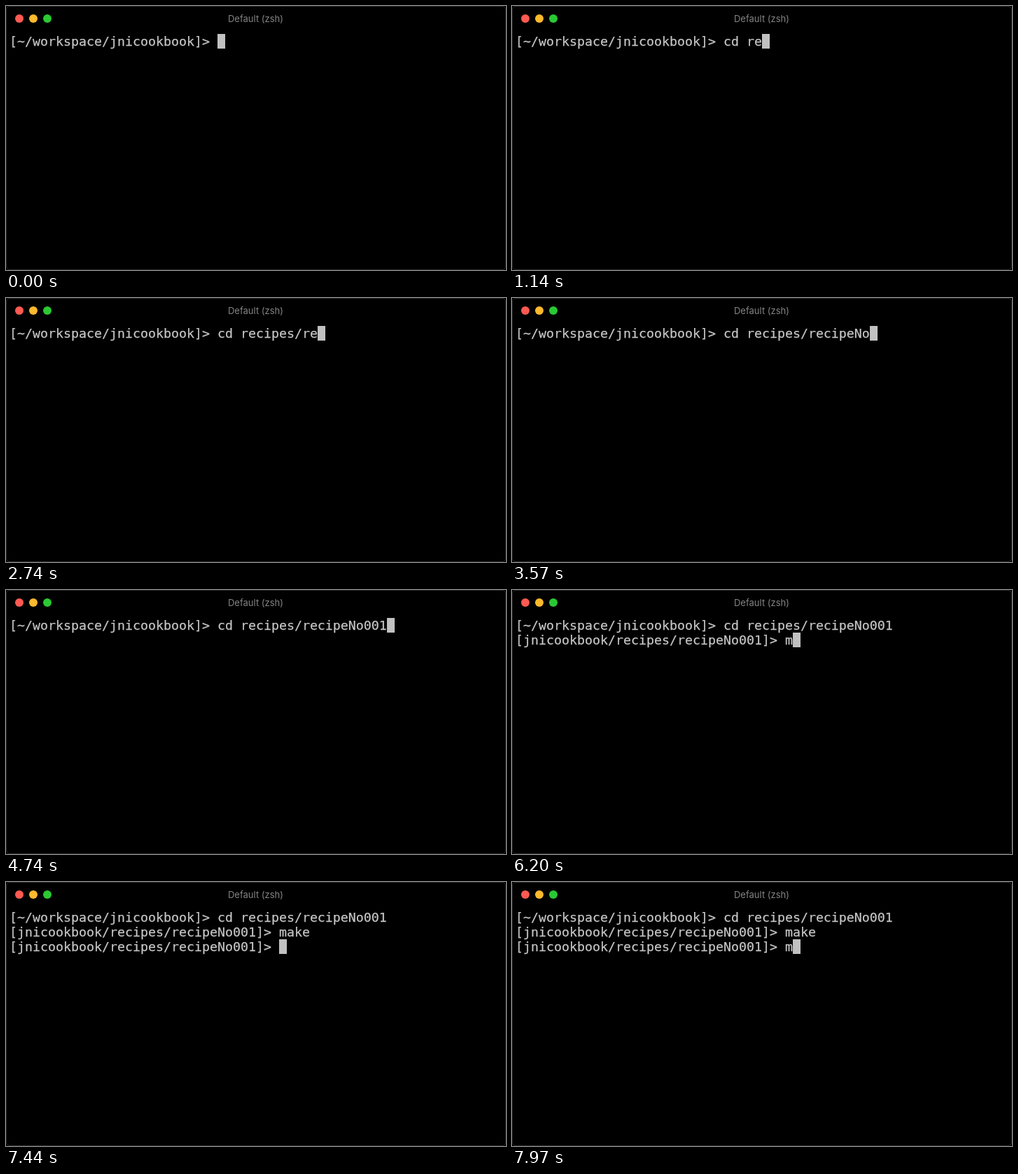
These frames come from a looping animation (714 by 378 pixels, 8000 ms). An HTML page:

```html
<!DOCTYPE html>
<html lang="en">
<head>
<meta charset="utf-8">
<title>Terminal</title>
<style>
  html, body { margin: 0; width: 100%; height: 100%; overflow: hidden; background: #000; }
  #window { position: absolute; left: 0; top: 0; width: 714px; height: 378px; overflow: hidden; background: #000; }
  #frame { position: absolute; inset: 0; border: 1px solid #2a2a2a; border-radius: 5px; }
  .light { position: absolute; top: 12px; width: 12px; height: 12px; border-radius: 50%; }
  #title {
    position: absolute; left: 0; top: 10px; width: 713px; text-align: center;
    font: 13px/17px Inter, sans-serif; color: #858585;
  }
  #screen {
    position: absolute; left: 5px; top: 40px; margin: 0;
    font: 18.27px/21px "DejaVu Sans Mono", monospace;
    font-variant-ligatures: none; color: #c5c5c5;
    -webkit-text-stroke: 0.25px #c5c5c5;
  }
  #cursor { position: absolute; left: 5px; top: 40px; width: 11px; height: 21px; background: #c1c1c1; }
</style>
</head>
<body>
<div id="window">
  <div id="frame"></div>
  <div class="light" style="left:13px; background:#ff5a52"></div>
  <div class="light" style="left:33px; background:#fdb92d"></div>
  <div class="light" style="left:53px; background:#2ac833"></div>
  <div id="title">Default (zsh)</div>
  <pre id="screen"></pre>
  <div id="cursor"></div>
</div>
<script>
  const LOOP = 8000, CELL_W = 11, CELL_H = 21;
  const HOME = "[~/workspace/jnicookbook]> ";
  const RECIPE = "[jnicookbook/recipes/recipeNo001]> ";

  // [time in ms, text appended to the screen]
  const output = [
    [0, HOME],
    [500, "c"], [600, "d"], [770, " "],
    [1040, "r"], [1110, "e"], [1540, "c"], [1700, "i"],
    [1940, "p"], [2040, "e"], [2240, "s"], [2470, "/"],
    [2700, "r"], [2740, "e"], [3270, "c"], [3370, "i"], [3540, "peNo"],
    [4400, "0"], [4600, "0"], [4740, "1"],
    [5270, "\n" + RECIPE],
    [6200, "m"], [6300, "a"], [6470, "k"], [6570, "e"],
    [6970, "\n"], [7440, RECIPE], [7970, "m"]
  ];

  const screenEl = document.getElementById("screen");
  const cursor = document.getElementById("cursor");
  const start = performance.now();
  let shown = null;

  function render(time) {
    const text = output.filter(([at]) => at <= time).map(([, part]) => part).join("");
    if (text === shown) return;
    shown = text;
    screenEl.textContent = text;
    const lines = text.split("\n");
    const x = lines[lines.length - 1].length * CELL_W;
    const y = (lines.length - 1) * CELL_H;
    cursor.style.transform = `translate(${x}px, ${y}px)`;
  }

  function tick() {
    render((performance.now() - start) % LOOP);
    requestAnimationFrame(tick);
  }
  tick();
</script>
</body>
</html>
```
